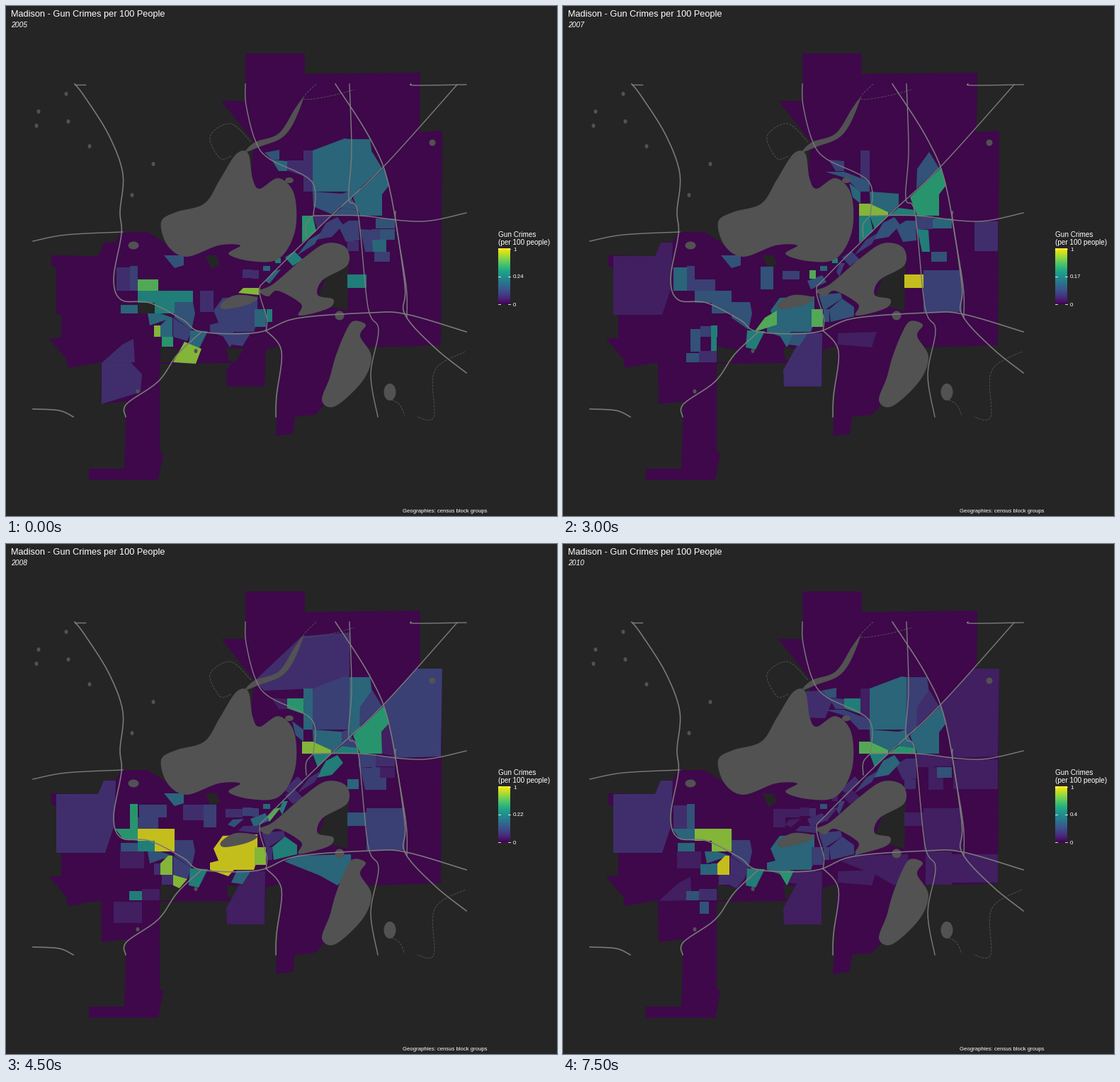
These frames come from a looping animation (778 px wide and 720 px high, 8 s). A matplotlib script:

```python
import numpy as np
import matplotlib.pyplot as plt
from matplotlib.animation import FuncAnimation
from matplotlib.patches import Polygon, Ellipse

W, H, DPI = 778, 720, 100
BG, WATER, ROAD = "#252525", "#525252", "#7b7b7b"
START = 2005
MIDS = ["0.24", "0.23", "0.17", "0.22", "0.36", "0.4"]
SHADES = dict(plum=8, indigo=14, blue=21, slate=29, teal=39, jade=51,
              green=63, leaf=75, lime=85, gold=97)
viridis = plt.get_cmap("viridis")

fig = plt.figure(figsize=(W / DPI, H / DPI), dpi=DPI, facecolor=BG)
ax = fig.add_axes([0, 0, 1, 1])
ax.axis("off")
areas = []


def tint(name):
    """Colour scale at 80% opacity over the background."""
    if name == "void":
        return BG
    rgb = np.array(viridis(SHADES.get(name, 0) / 100)[:3])
    return 0.8 * rgb + 0.2 * 37 / 255


def pairs(xy):
    return np.reshape(xy, (-1, 2)).astype(float)


def curve(pts, closed=False, steps=8):
    """Catmull-Rom curve through the points."""
    if closed:
        p = np.vstack([pts[-1:], pts, pts[:2]])
    else:
        p = np.vstack([pts[:1], pts, pts[-1:]])
    a, b, c, d = p[:-3], p[1:-2], p[2:-1], p[3:]
    t = np.linspace(0, 1, steps)[:, None, None]
    q = b + t / 2 * (c - a + t * (2 * a - 5 * b + 4 * c - d + t * (3 * b - a - 3 * c + d)))
    return q.transpose(1, 0, 2).reshape(-1, 2)


def shape(color, pts, z=1):
    return ax.add_patch(Polygon(pts, fc=color, lw=0, zorder=z))


def area(shades, *xy):
    """Block group: one shade per year, then two box corners or a polygon."""
    if len(xy) == 4:
        l, t, r, b = xy
        xy = (l, t, r, t, r, b, l, b)
    areas.append((shape(BG, pairs(xy), 2), shades.split()))


def lake(*xy):
    shape(WATER, curve(pairs(xy), True), 4)


def pond(x, y, w=5, h=6):
    ax.add_patch(Ellipse((x, y), w, h, fc=WATER, lw=0, zorder=4))


def line(*xy, color=ROAD, lw=1.4, z=5, ls="-"):
    x, y = curve(pairs(xy)).T
    ax.plot(x, y, color=color, lw=lw * 72 / DPI, zorder=z, ls=ls)


def stream(*xy):
    line(*xy, color=WATER, lw=0.9, z=4, ls="--")


def label(x, y, s, px, **kw):
    return ax.text(x, y, s, color="white", fontsize=px * 72 / DPI,
                   family="Liberation Sans", va="baseline", zorder=9, **kw)


# City limits and the gaps inside them
shape(tint("-"), pairs((
    338, 67, 422, 67, 422, 96, 585, 94, 584, 178, 616, 176, 614, 479, 512, 482,
    470, 540, 437, 577, 408, 580, 405, 604, 381, 607, 388, 480, 367, 485, 365, 537,
    312, 537, 311, 514, 320, 504, 217, 505, 217, 627, 222, 632, 215, 669, 117, 669,
    117, 653, 167, 653, 170, 558, 135, 562, 134, 503, 88, 511, 85, 498, 61, 470,
    78, 468, 78, 436, 71, 435, 71, 370, 64, 367, 64, 352, 130, 353, 138, 334,
    155, 333, 163, 319, 200, 319, 225, 335, 340, 300, 350, 192, 304, 134, 338, 134)))
shape(BG, pairs((282, 352, 297, 352, 302, 364, 290, 372)))
shape(BG, pairs((218, 480, 247, 486, 238, 503, 218, 503)))
shape(BG, pairs((311, 482, 336, 484, 324, 502, 314, 500)))
shape(BG, pairs((438, 420, 455, 372, 484, 360, 482, 430)))

# North
area("- - - indigo plum -", 350, 194, 418, 130, 485, 125, 485, 188, 433, 204, 365, 207)
area("- - - - plum -", 450, 96, 585, 95, 584, 163, 504, 163)
area("- - - blue - plum", 579, 176, 616, 176, 614, 300, 550, 302, 534, 226)
area("teal blue - blue blue teal", 433, 204, 478, 187, 485, 188, 485, 262, 433, 262)
area("indigo blue indigo teal slate plum", 420, 204, 433, 262)
area("teal slate - teal jade blue", 485, 188, 514, 188, 517, 210, 498, 264, 484, 272)
area("teal blue slate blue blue indigo", 517, 206, 531, 229, 499, 258, 500, 230)
area("teal green green green blue teal",
     534, 228, 541, 253, 531, 266, 531, 296, 500, 296, 490, 270)
area("- - - plum blue -", 541, 253, 550, 300, 531, 296, 530, 265)
area("slate gold teal teal blue teal", 433, 262, 474, 265, 474, 281, 460, 294, 434, 283)
area("slate indigo - blue blue teal", 474, 265, 483, 262, 497, 288, 474, 285)
area("slate jade jade jade leaf green", 460, 296, 474, 285, 497, 288, 497, 296)
area("- jade lime lime blue leaf", 418, 279, 433, 279, 459, 291, 459, 296, 418, 296)
area("- teal teal slate - -", 404, 250, 420, 262, 420, 279, 409, 270)
area("- - - - indigo indigo", 343, 208, 365, 207, 380, 222, 370, 246, 345, 245)
area("slate slate - - - slate", 365, 207, 386, 203, 386, 217, 375, 217)
area("teal blue blue plum teal blue", 375, 217, 397, 219, 397, 233, 385, 233)
area("indigo green - green slate jade", 397, 218, 420, 218, 420, 240, 397, 232)
area("- blue slate - slate blue", 370, 234, 397, 234, 433, 248, 433, 262, 418, 262, 400, 243)

# East
area("- blue - - - plum", 551, 305, 581, 346)
area("- - indigo - - plum", 581, 304, 614, 346)
area("- - blue blue slate plum", 498, 297, 522, 315)
area("slate - teal indigo slate plum", 522, 300, 549, 314)
area("blue slate - blue jade plum", 516, 315, 528, 330)
area("slate - - plum blue slate", 528, 315, 549, 330)
area("teal - - blue indigo plum", 516, 330, 537, 347)
area("blue slate slate - indigo -", 520, 347, 542, 361)
area("- slate - - indigo -", 508, 347, 520, 373)
area("blue slate jade blue indigo -", 500, 315, 516, 316, 518, 347, 507, 347)
area("blue blue slate - - indigo", 470, 312, 484, 303, 498, 303, 499, 331, 480, 333)
area("indigo - - teal jade indigo", 482, 332, 498, 346)
area("jade gold gold slate leaf plum", 482, 379, 509, 398)
area("- - blue blue indigo plum", 509, 373, 563, 432)
area("- - - - indigo plum", 512, 434, 549, 481)
area("- - - - - plum", 549, 438, 614, 478)

# Isthmus and downtown
area("green - jade - jade -", 418, 296, 433, 296, 438, 318, 418, 334)
area("indigo blue jade jade - jade", 433, 296, 459, 296, 440, 315)
area("blue teal slate jade jade teal", 452, 306, 468, 298, 476, 309, 460, 326, 438, 330)
area("slate jade blue indigo indigo blue", 428, 330, 445, 320, 436, 336, 411, 352)
area("jade blue blue indigo - plum", 394, 355, 407, 346, 419, 358, 405, 367)
area("- slate - indigo - indigo", 392, 347, 412, 328, 420, 337, 400, 352)
area("- leaf blue jade teal blue", 386, 375, 391, 363, 398, 363, 390, 382)
area("teal plum - leaf slate indigo", 366, 388, 378, 374, 388, 372, 372, 392)
area("- indigo slate teal - indigo", 345, 388, 366, 380, 372, 390, 350, 400)
area("jade indigo jade - blue plum", 380, 356, 388, 363)
area("teal indigo teal teal blue slate", 363, 367, 373, 374)
area("indigo - - blue indigo plum", 334, 372, 348, 384)
area("indigo blue leaf blue blue indigo", 348, 373, 357, 385)
area("- teal - slate - plum", 313, 396, 320, 389, 336, 388, 322, 400)
area("- - blue indigo blue plum", 310, 374, 334, 386)
area("lime - - indigo plum indigo", 328, 405, 335, 398, 357, 398, 357, 408)

# South
area("- plum slate indigo jade blue", 361, 408, 392, 405, 394, 413, 368, 430)
area("- indigo slate jade plum blue", 376, 428, 394, 413, 411, 425, 411, 438, 378, 446)
area("jade teal slate indigo lime blue", 368, 428, 376, 446)
area("- teal - blue indigo teal", 411, 440, 420, 430, 445, 430)
area("- - - teal indigo plum", 393, 448, 411, 440, 487, 438, 488, 462, 468, 482, 443, 468)
area("- plum plum - indigo plum", 388, 462, 443, 460, 436, 482, 388, 478)
area("- - indigo plum plum plum", 340, 462, 366, 462, 365, 537, 312, 537, 311, 514)
area("blue jade teal gold gold teal", 293, 430, 306, 412, 355, 410, 355, 445, 350, 460,
     322, 460, 314, 469, 288, 460, 288, 450, 300, 447)
area("teal blue leaf lime blue blue", 351, 428, 367, 453)
area("blue - teal - - green", 304, 462, 330, 461, 316, 482)
area("blue slate slate teal teal plum", 326, 461, 346, 461, 334, 480, 318, 478)

# West
area("- plum plum indigo plum indigo", 71, 353, 130, 353, 138, 334, 155, 334, 152, 400,
     140, 436, 71, 436)
area("indigo blue teal - indigo indigo", 156, 369, 176, 402)
area("blue slate blue green teal slate", 175, 367, 186, 402)
area("- teal - green indigo teal", 154, 402, 186, 402, 186, 419, 165, 416)
area("leaf jade blue blue - -", 186, 386, 215, 402)
area("jade teal slate gold lime lime",
     186, 402, 238, 402, 238, 434, 210, 434, 210, 419, 186, 419)
area("jade - - - - -", 238, 402, 264, 418)
area("void - - jade - -", 186, 419, 210, 434)
area("teal - - slate blue teal", 162, 422, 186, 434)
area("- - - plum indigo plum", 161, 434, 195, 458)
area("teal - - slate teal teal", 200, 434, 218, 434, 235, 440, 203, 451)
area("slate - slate blue blue blue", 238, 418, 264, 418, 267, 434, 262, 457, 238, 440)
area("blue indigo - blue indigo indigo", 236, 440, 262, 457, 256, 473, 236, 467)
area("indigo - - - - -", 274, 402, 293, 432)
area("slate - slate teal slate -", 223, 352, 251, 352, 251, 366, 238, 370)
area("- slate slate blue indigo -", 279, 368, 297, 400)
area("- slate - - indigo plum", 297, 374, 314, 400)
area("- - - blue - -", 188, 368, 227, 386)
area("- - - indigo indigo -", 250, 368, 279, 390)
area("lime - jade indigo jade teal", 209, 451, 218, 467)
area("teal green - lime indigo gold", 218, 451, 229, 440, 235, 440, 235, 467, 218, 467)
area("green jade - indigo teal indigo", 220, 467, 236, 481)
area("- indigo - lime teal indigo", 236, 467, 256, 473, 245, 486, 236, 482)
area("- indigo leaf - - -", 270, 460, 285, 440, 302, 430, 302, 450)
area("teal blue jade jade jade jade", 260, 458, 285, 459, 272, 485, 258, 482)
area("lime indigo - - - -", 236, 503, 252, 474, 276, 484, 268, 505)
area("indigo - - - - plum", 135, 504, 164, 478, 180, 470, 182, 503)
area("indigo - - - - -", 135, 504, 176, 503, 192, 520, 190, 545, 135, 562)
area("- slate - - - slate", 193, 505, 206, 522)
area("- - - plum plum -", 152, 505, 192, 535)
area("- - slate jade blue slate", 174, 490, 192, 503)
area("- - indigo plum plum indigo", 192, 487, 217, 503)
area("- - slate - blue -", 180, 456, 194, 488)
area("- blue blue - plum teal", 194, 452, 209, 467)
area("- - jade - - -", 209, 467, 217, 487)

# Water
lake(219, 305, 240, 291, 280, 279, 302, 245, 325, 209, 342, 208, 348, 243, 358, 258,
     385, 243, 407, 266, 408, 318, 385, 357, 345, 360, 314, 350, 331, 338, 300, 338,
     255, 354, 228, 338)
lake(338, 206, 352, 192, 385, 180, 408, 145, 420, 130, 405, 167, 388, 187, 360, 198)
lake(358, 402, 378, 392, 420, 356, 452, 335, 480, 341, 482, 366, 447, 387, 440, 408,
     462, 414, 455, 427, 414, 437, 417, 421, 384, 402, 370, 410)
lake(478, 463, 490, 445, 508, 450, 500, 466, 516, 495, 503, 530, 465, 565, 446, 557,
     457, 525, 465, 496)
lake(304, 420, 325, 408, 355, 412, 340, 422, 308, 428)
pond(542, 545, 17, 24)
pond(471, 437, 13, 13)
pond(180, 338, 15, 11)
pond(400, 246, 12, 8)
pond(602, 193, 9, 9)
for x, y in pairs((46, 149, 43, 169, 85, 124, 88, 163, 118, 198, 178, 267,
                   208, 223, 268, 487, 186, 544)):
    pond(x, y)
stream(346, 192, 317, 166, 288, 184, 302, 215, 318, 212)
stream(438, 110, 420, 131, 458, 127, 492, 118)
stream(648, 488, 605, 515, 604, 580, 580, 580)
stream(545, 556, 556, 563, 563, 578)

# Highways
line(97, 110, 111, 128, 145, 182, 165, 237, 161, 290, 163, 322, 152, 385, 163, 415,
     203, 419, 250, 443, 276, 460, 355, 461, 410, 441, 515, 433, 565, 435, 650, 460, lw=1.6)
line(97, 111, 112, 111)
line(38, 332, 85, 323, 165, 319)
line(276, 460, 242, 492, 215, 530, 170, 562, 169, 580, lw=1.6)
line(38, 569, 75, 571, 95, 580, lw=1.6)
line(367, 458, 389, 487, 382, 550, 381, 580, lw=1.6)
line(338, 110, 339, 140, 352, 190, 372, 216, 432, 248, 434, 296)
line(485, 110, 488, 205, 484, 272, 497, 292, 511, 425, 526, 457, 515, 520, 525, 580)
line(465, 110, 514, 187, 541, 255, 563, 392, 563, 435, 605, 482, 650, 518, lw=1.6)
line(550, 290, 551, 310, 565, 395, 566, 440)
line(637, 111, 532, 228, 455, 300, 372, 382, 358, 402, 368, 440, 367, 459)
line(434, 296, 500, 296, 560, 303, 600, 303, 650, 292)
line(434, 296, 424, 308, 424, 326)
line(572, 110, 578, 112, 650, 111)

# Titles and legend
label(7, 14.5, "Madison - Gun Crimes per 100 People", 12.7)
year = label(7, 30, "", 10.3, style="italic")
label(560, 715, "Geographies: census block groups", 7.8)
label(695, 325.5, "Gun Crimes", 10)
label(695, 337, "(per 100 people)", 10)
ax.imshow(np.linspace(1, 0, 256)[:, None], cmap=viridis, extent=(695, 712, 421, 342),
          aspect="auto", zorder=6)
for y in (342.5, 381.5, 420.5):
    for x in (695, 708.6):
        ax.plot([x, x + 3.4], [y, y], color="white", lw=0.6, zorder=8)
label(716, 345.5, "1", 8)
mid = label(716, 384.5, "", 8)
label(716, 423.5, "0", 8)
ax.set(xlim=(0, W), ylim=(H, 0))


def draw(n):
    k = n // 3
    for patch, shades in areas:
        patch.set_visible(shades[k] != "-")
        patch.set_facecolor(tint(shades[k]))
    year.set_text(str(START + k))
    mid.set_text(MIDS[k])


anim = FuncAnimation(fig, draw, frames=16, interval=500, init_func=lambda: draw(0),
                     repeat=True, repeat_delay=0)
plt.show()
```
